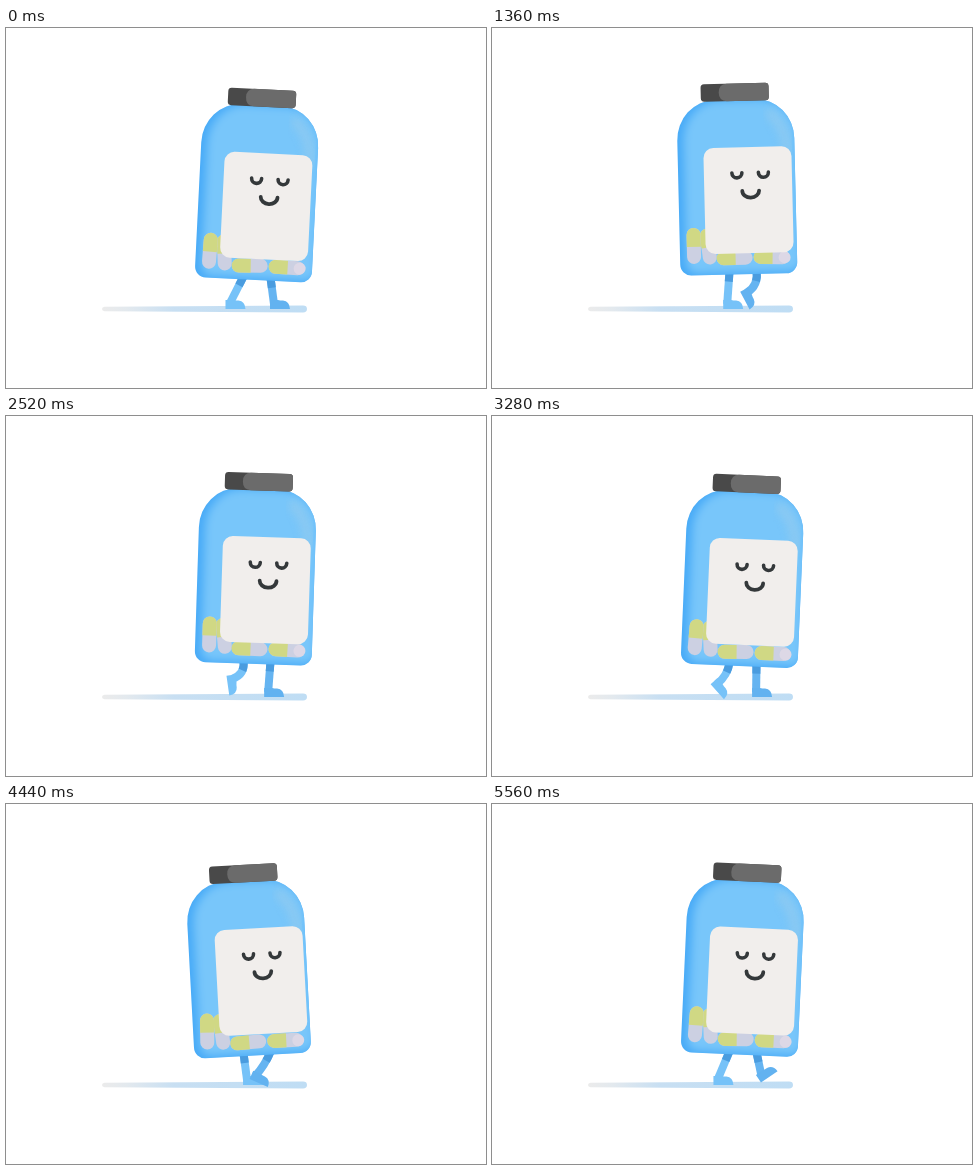
Recreate the animation shown at these times as an HTML page. Size 480x360 px, loop 5.6 s.

```html
<!DOCTYPE html>
<html lang="en">
<head>
<meta charset="utf-8">
<title>Walking pill bottle</title>
<style>
  html, body { margin: 0; width: 100%; height: 100%; overflow: hidden; background: #fff; }
  svg { display: block; width: 100vw; height: 100vh; }
  .leg path, .face path { fill: none; }
  .leg .limb { stroke-width: 8; }
  .leg .thigh { stroke: #4a9cdf; stroke-width: 8; stroke-dasharray: 10 99; }
  .left .limb { stroke: #76c2f8; }
  .left .foot { fill: #76c2f8; }
  .right .limb { stroke: #65b4f1; }
  .right .foot { fill: #62b2f0; }
  .face { stroke: #34383a; stroke-linecap: round; }
</style>
</head>
<body>
<svg viewBox="0 0 480 360">
  <defs>
    <linearGradient id="ground">
      <stop offset="0" stop-color="#ebebeb"/>
      <stop offset=".12" stop-color="#e3e9ee"/>
      <stop offset=".35" stop-color="#c8dff2"/>
      <stop offset="1" stop-color="#bfddf4"/>
    </linearGradient>
    <filter id="soft" x="-20%" y="-20%" width="140%" height="140%">
      <feGaussianBlur stdDeviation="4.5"/>
    </filter>
    <path id="glass" d="M-20.5-175H20.5A38 40 0 0 1 58.5-135V-11A11 11 0 0 1 47.5 0H-47.5A11 11 0 0 1-58.5-11V-135A38 40 0 0 1-20.5-175Z"/>
    <clipPath id="inside"><use href="#glass"/></clipPath>
    <g id="pill">
      <rect x="-7" y="-18" width="14" height="36" rx="7" fill="#ccd0e2"/>
      <path d="M-7 1V-11A7 7 0 0 1 7-11V1Z" fill="#d0d884"/>
    </g>
    <path id="sole" d="M-4 5V-4H4Q6-3.500 9-3.500Q15.500-3 16 5Z"/>
  </defs>

  <path fill="url(#ground)" d="M98.5 278.8L297 277.6Q301 277.6 301 281Q301 284.4 297 284.4L98.5 283.2Q96 283 96 281Q96 279 98.5 278.8Z"/>

  <g class="leg left"><path class="limb"/><path class="thigh"/><use class="foot" href="#sole"/></g>
  <g class="leg right"><path class="limb"/><path class="thigh"/><use class="foot" href="#sole"/></g>

  <g id="bottle">
    <use href="#glass" fill="#47aaf7"/>
    <g clip-path="url(#inside)">
      <use href="#glass" fill="#78c6fa" filter="url(#soft)" transform="translate(5 -2) scale(.98 .985)"/>
      <path d="M32-162Q50-150 52-118" fill="none" stroke="#93cbef" stroke-width="9" opacity=".8" filter="url(#soft)"/>
    </g>
    <g id="pills">
      <use href="#pill"/><use href="#pill"/><use href="#pill"/><use href="#pill"/>
      <circle cx="46" cy="-15.5" r="6" fill="#ddd8e6"/>
    </g>
    <rect x="-34" y="-191" width="68" height="17.5" rx="3.5" fill="#494949"/>
    <path d="M-8-191H30.5Q34-191 34-187.5V-177Q34-173.5 30.5-173.5H-8Q-16-174-16-182.2Q-16-190.500-8-191Z" fill="#6b6b6b"/>
    <g id="label">
      <rect x="-44" y="-53" width="88" height="106" rx="10" fill="#f1eeec"/>
      <g class="face">
        <path stroke-width="3.6" d="M-16-27.500a5 5 0 0 0 10 0M10.500-27.500a5 5 0 0 0 10 0"/>
        <path stroke-width="3.800" d="M-6-9.300a8.400 6.800 0 0 0 16.800 0"/>
      </g>
    </g>
  </g>
</svg>
<script>
const LOOP = 5600, STRIDE = 800, STEP = 40, CENTER = 247;

// One stride of a leg: time, ankle x, ankle y, foot angle, knee bend
const GAIT = [
  [0, 268, 276, 0, 0],
  [400, 248.5, 276, 0, 0],
  [480, 250, 268, 48, 5],
  [520, 251, 263, 82, 9],
  [560, 254.5, 265, 62, 8],
  [640, 262, 268, 18, 5],
  [720, 268.5, 269, -25, 0],
  [760, 269.5, 272, -34, 0],
  [800, 268, 276, 0, 0]
];

// Resting x, y and angle of each pill
const PILLS = [[-30, -28, -7], [-44.5, -29, 2], [-4, -16, -90], [33, -16, -90]];

const $ = (q, el = document) => el.querySelector(q);
const place = (el, x, y, turn) =>
  el.setAttribute('transform', `translate(${x} ${y}) rotate(${turn})`);
const wave = (t, period) => Math.cos(2 * Math.PI * t / period);

function gaitAt(t) {
  const i = GAIT.findIndex(k => k[0] > t);
  const a = GAIT[i - 1], b = GAIT[i];
  const f = (t - a[0]) / (b[0] - a[0]);
  return a.slice(1).map((v, n) => v + (b[n + 1] - v) * f);
}

function drawLeg(leg, t, hipX, shift, hipY) {
  const [footX, y, turn, bend] = gaitAt(t % STRIDE);
  const x = footX + shift;
  const dx = x - hipX, dy = y - hipY, len = Math.hypot(dx, dy);
  const kneeX = hipX + dx / 2 + dy / len * bend;
  const kneeY = hipY + dy / 2 - dx / len * bend;
  const d = `M${hipX} ${hipY}Q${kneeX} ${kneeY} ${x} ${y}`;
  for (const p of leg.querySelectorAll('path')) p.setAttribute('d', d);
  place($('.foot', leg), x, y, turn);
}

function draw(t) {
  // The body trails the feet slightly
  const sway = wave(t - 13, STRIDE), bob = wave(t - 13, STRIDE / 2);
  const tilt = 3 * sway - 0.15;
  const base = 248.2 + 3.1 * bob + 0.75 * bob * bob;
  const slope = Math.sin(tilt * Math.PI / 180);
  const hipY = x => base - 3 + (x - CENTER) * slope;

  place($('#bottle'), CENTER, base, tilt);
  place($('#label'), 10.8 - 1.2 * sway, -74.1, 0);
  place($('#pills'), 0, 2.5 * wave(t - 45, STRIDE / 2), 0);
  document.querySelectorAll('#pills use').forEach((el, i) => {
    const [x, y, turn] = PILLS[i];
    place(el, x, y, turn + 2 * wave(t + i * 300, LOOP / 5));
  });
  drawLeg($('.left'), t + STRIDE / 2, 237.5, -25, hipY(237.5));
  drawLeg($('.right'), t, 264.5, 0, hipY(264.5));
}

const start = performance.now();
function tick() {
  const t = (performance.now() - start) % LOOP;
  draw(Math.floor(t / STEP) * STEP);
  requestAnimationFrame(tick);
}
tick();
</script>
</body>
</html>
```
